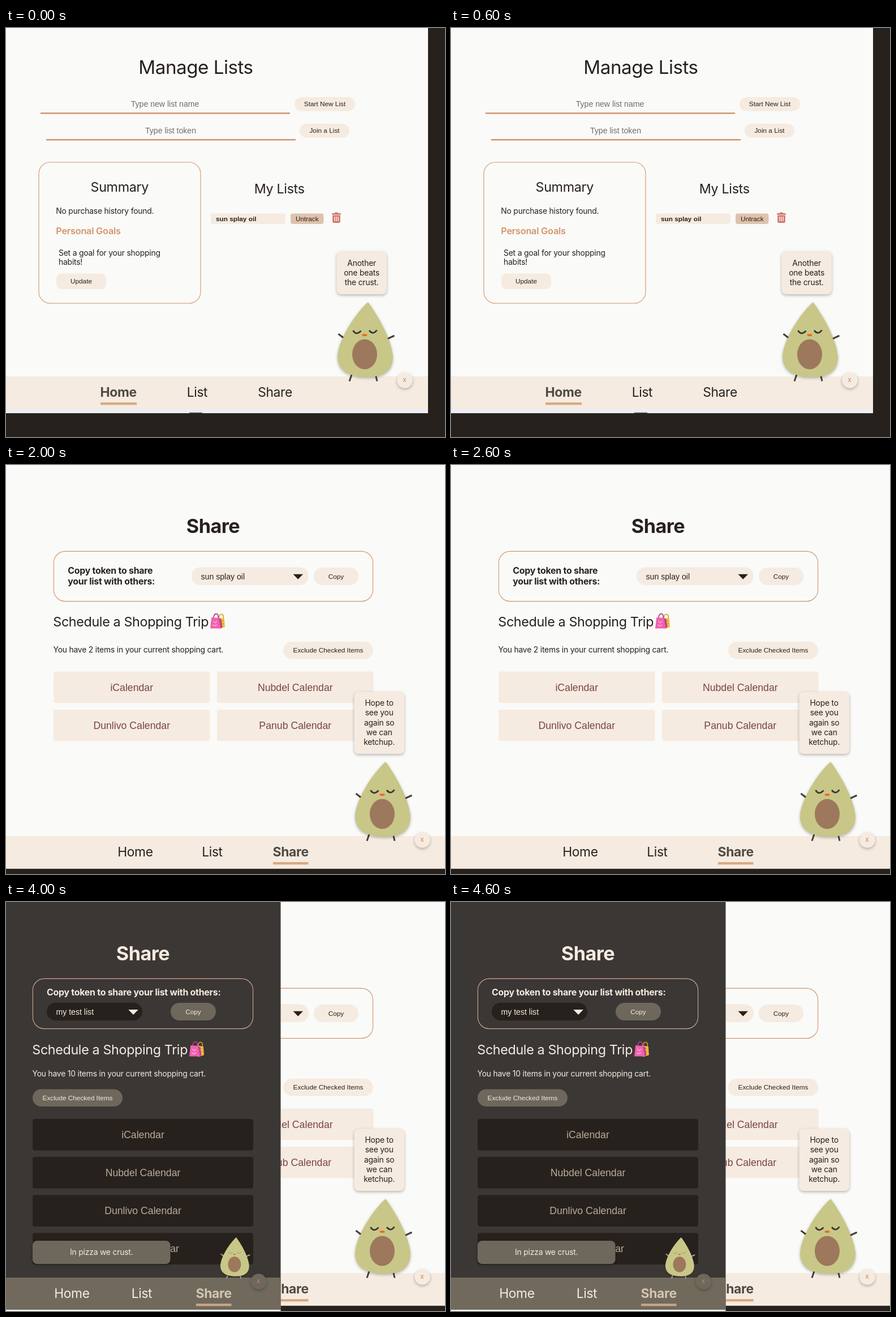
Write an HTML page that moves like this. It is 776 by 722 pixels and loops after 5000 ms.

```html
<!DOCTYPE html>
<html lang="en">
<head>
<meta charset="utf-8">
<title>Shopping list app</title>
<style>
html, body { margin: 0; width: 100%; height: 100%; overflow: hidden; background: #27211d; }
#stage { display: block; width: 776px; height: 722px; }
text { font-family: Inter, "Noto Sans", sans-serif; letter-spacing: -.015em; white-space: pre; }
text.form { font-family: "Liberation Sans", Arial, sans-serif; letter-spacing: 0; }
text.date { font-family: "Liberation Mono", monospace; letter-spacing: .45px; }
.lift { filter: drop-shadow(0 2px 2.5px rgba(0, 0, 0, .28)); }
</style>
</head>
<body>
<svg id="stage" viewBox="0 0 776 722" xmlns="http://www.w3.org/2000/svg"></svg>
<script>
const INK = '#27211d', PAPER = '#fafaf8', CREAM = '#f5ebe0', TAN = '#dec2ad', ORANGE = '#d3956a',
  GRAY = '#716d69', RED = '#d27768', PLUM = '#7a4444', COAL = '#3b3735', STONE = '#6e675b',
  BROWN = '#8c6a47', SAND = '#d0c0ab';

// Shapes
const rect = (x, y, x2, y2, fill, r = 0, extra = '') =>
  `<rect x="${x}" y="${y}" width="${x2 - x}" height="${y2 - y}" rx="${r}" fill="${fill}" ${extra}/>`;
const frame = (x, y, x2, y2, color, r, w, extra = '') =>
  rect(x, y, x2, y2, 'none', r, `stroke="${color}" stroke-width="${w}" ${extra}`);
const path = (d, color, w = 2.6) =>
  `<path d="${d}" fill="none" stroke="${color}" stroke-width="${w}"/>`;
const rule = (x, x2, y, color = ORANGE) => path(`M${x} ${y}H${x2}`, color, 2.5);
const solid = (d, fill) => `<path d="${d}" fill="${fill}"/>`;
const move = (x, y, body, scale = 1) =>
  `<g transform="translate(${x} ${y}) scale(${scale})">${body}</g>`;

// Text
const text = (x, y, str, size = 13.9, fill = INK, anchor = 'start', weight = 400, cls = '') =>
  `<text class="${cls}" x="${x}" y="${y}" font-size="${size}" fill="${fill}" text-anchor="${anchor}" font-weight="${weight}">${str}</text>`;
const mid = (x, y, str, size, fill, weight) => text(x, y, str, size, fill, 'middle', weight);
const bold = (x, y, str, size, fill, weight = 700) => text(x, y, str, size, fill, 'start', weight);
const form = (x, y, str, size = 14.1, fill = INK, anchor = 'start', weight = 400) =>
  text(x, y, str, size, fill, anchor, weight, 'form');

// Widgets
const button = (x, y, x2, y2, label, { fill = CREAM, color = INK, size = 11.8, r = 16 } = {}) =>
  rect(x, y, x2, y2, fill, Math.min(r, (y2 - y) / 2)) +
  form((x + x2) / 2, (y + y2) / 2 + size * .36, label, size, color, 'middle');

const select = (x, y, x2, label, { fill = '#f4ebdf', color = INK, r = 8, pad = 16.5, gap = 13 } = {}) =>
  rect(x, y, x2, y + 31.5, fill, r) + form(x + pad, y + 21, label, 14.1, color) +
  solid(`M${x2 - gap - 9} ${y + 12.3}h17.5l-8.75 9z`, color);

const cross = (x, y, color, w) =>
  path(`M${x - 12.5} ${y - 12.5}l25 25m0 -25l-25 25`, color, w);
const checkbox = (x, y, fill) =>
  rect(x, y, x + 37, y + 37, fill, 9, `stroke="#d19a6e" stroke-width="2" stroke-dasharray="6 4"`);

const pencil = (x, y, color) => move(x, y,
  solid('M-6 6l1-4 6.5-6.5 3 3-6.5 6.5zM2.5-5.5l1.2-1.2q1.2-.8 2.2.2l.7.7q1 1 .2 2.2l-1.2 1.2z', color));

const trash = (x, y) => move(x, y,
  rect(-8, -7.5, 8, -5, RED, 1) + rect(-3, -9, 3, -7, RED, 1) +
  solid('M-6.8-4H6.8V7q0 2.5-2.5 2.5h-8.6q-2.5 0-2.5-2.5z', RED) +
  path('M-3.2-1.5v8M0-1.5v8M3.2-1.5v8', PAPER, 1.4));

const dateIcon = (x, y) =>
  frame(x - 5, y - 5, x + 5, y + 6, INK, 1, 1.5) + rect(x - 5, y - 5, x + 5, y - 1.5, INK) +
  path(`M${x - 3} ${y - 7}v3m6 0v-3`, INK, 1.5) + rect(x + .5, y + 1.5, x + 3, y + 4, INK);

const dateField = (x, x2) =>
  text(x + .5, 379, 'mm/dd/yyyy', 14.1, INK, 'start', 400, 'date') +
  dateIcon(x2 - 9, 374.5) + rule(x, x2, 387);

const bags = (x, y) => move(x, y,
  path('M2-5q1-7 5-6q4 1 2 8', '#d99a2b', 1.5) +
  solid('M0-6l11 2 1 14-10 3z', '#f2bf3c') + path('M4-1l6 .5M4 4l7 .5', '#d99a2b', 1.2) +
  path('M-7-4q1-8 5-8q4 0 3 8', '#b03a86', 1.6) +
  solid('M-10-6l12 1 3 17-17 0z', '#f062b0') + solid('M2-5l3 17 3-2-2-13z', '#c2408e') +
  path('M-7 0l3 3 3-3M-8 6l3 2 4-2', '#fbb0da', 1.4), 1.08);

const nav = (y, y2, width, labels, active, { fill = CREAM, color = INK, strong = '#4f4a45', bar = '#d9a981' } = {}) => {
  const base = y + 36;
  return rect(0, y, width, y2, fill) + labels.map(([name, x, w]) => name === active
    ? bold(x - .5, base, name, 22.9, strong) + rect(x, base + 10, x + w, base + 14.3, bar)
    : text(x - .8, base, name, 22.8, color)).join('');
};
const tabs = (home, list, share) => [['Home', home, 64], ['List', list, 39], ['Share', share, 62.5]];

// Mascot, with its tip at the origin
const avocado = (limb, eye, w = 3) =>
  path('M-52.5 56l8.5 6.5M34.5 64.5l12-5.5M-29 128l-4 11.5M13.5 129l2.5 10.5', limb, w) +
  `<g class="lift">${solid('M0 0C14 19 40 60 44 96C44 120 29 132 0 132C-38 132-54 119-54 95C-52 64-20 17 0 0z', '#c8c788')}</g>` +
  path('M35 64.5l11-5.2M-47 60.3l3 2.2', limb, w) +
  path('M-26.5 50q5.5 9.5 14 .5M2 50q7 8.5 13.5-.8', eye, 2.8) +
  '<ellipse cx="-6" cy="58" rx="4.6" ry="2.1" fill="#ee6a1f"/>' +
  '<ellipse cx="-6" cy="92" rx="22" ry="26.5" fill="#9d785c"/>';

const closeButton = (x, y, fill) =>
  `<circle class="lift" cx="${x}" cy="${y}" r="13.8" fill="${fill}"/>` + form(x - .5, y + 3, 'x', 12, '#cf8452', 'middle');

const mascot = (dx, dy, lines) => move(dx, dy,
  rect(584.5, 445.3 - lines.length * 17, 673, 470, CREAM, 8, 'class="lift"') +
  lines.map((line, i) => mid(628.7, 453.7 - (lines.length - 1 - i) * 17.1, line)).join('') +
  move(640, 484, avocado('#46413d', '#3d3733')) + closeButton(705, 622, CREAM));

const toast = (x, x2, y, line) =>
  rect(x, y, x2, y + 41, STONE, 8, 'class="lift"') + mid((x + x2) / 2, y + 25.3, line, 13.9, CREAM);
const smallMascot = (x, y) =>
  move(x, y, avocado('#b8ad9c', '#a3a68a', 3.2), .52) + closeButton(x + 39.5, y + 78, STONE);

const layer = (width, height, body) =>
  `<svg width="${width}" height="${height}" style="overflow:hidden">${body}</svg>`;

// Screens
const homeLight = () => layer(746, 680,
  rect(0, 0, 746, 680, PAPER) + mid(335.5, 80.5, 'Manage Lists', 33.2) +
  form(281, 139, 'Type new list name', 14.1, GRAY, 'middle') + rule(61, 502, 150.5) +
  button(510, 122, 617, 146.5, 'Start New List') +
  form(291, 186, 'Type list token', 14.1, GRAY, 'middle') + rule(71, 512, 197.3) +
  button(519, 169, 607, 193.5, 'Join a List') +
  frame(58, 237, 344, 486, ORANGE, 20, 1.1) + mid(200.8, 289, 'Summary', 23.3) +
  text(88.3, 328, 'No purchase history found.') +
  bold(88.3, 364, 'Personal Goals', 16.3, ORANGE, 600) +
  text(93, 402, 'Set a goal for your shopping') + text(93, 417.5, 'habits!') +
  button(89, 433.5, 177, 461, 'Update', { r: 9 }) +
  mid(483.2, 292, 'My Lists', 23.3) +
  rect(362, 327.5, 494, 346, CREAM, 4) + form(371, 341, 'sun splay oil', 11.8, INK, 'start', 700) +
  button(503, 327.5, 561.5, 346, 'Untrack', { fill: TAN, r: 4 }) + trash(584, 334.5) +
  nav(615, 672, 746, tabs(167, 320.5, 446), 'Home') +
  rect(0, 672, 746, 680, '#eceef3') + rect(324, 678.7, 347, 680, '#55565c') +
  mascot(0, 0, ['Another', 'one beats', 'the crust.']));

const listLight = () => layer(729, 712.5,
  rect(0, 0, 729, 713, PAPER) +
  form(325, 41.5, 'sun splay oil', 35.3, INK, 'middle') + pencil(481, 31.5, ORANGE) +
  text(52.6, 71.5, 'Add:') + form(350, 70, 'Item name', 14.1, GRAY, 'middle') + rule(82, 618, 81.3) +
  text(52, 124.5, 'Frequency:') + select(125, 103.5, 228, 'Soon') +
  text(244.7, 124.5, 'Select List:') + select(316.5, 103.5, 475, 'sun splay oil', { gap: 15.5 }) +
  button(493, 106, 581, 132, 'Submit', { fill: TAN, size: 14.1 }) +
  frame(52, 169.5, 619, 544.5, '#dfbfa6', 10, 2) +
  bold(70, 209, 'Search &amp; Filter', 17.2, ORANGE, 600) +
  text(70, 259, 'Search by') + text(70, 275.7, 'Name:') +
  form(165.5, 266, 'Start typing here...', 14.1, GRAY) + rule(164, 600, 281.3) +
  frame(72.5, 322.5, 602, 419.5, '#dcb797', 9, 1, 'stroke-dasharray="3 2"') +
  rect(92, 318, 245.5, 328, PAPER) + text(95.7, 327.7, 'Search by Date Range:') +
  text(94, 380.5, 'Start:') + dateField(147.5, 325) +
  text(336.5, 380.5, 'End:') + dateField(383.5, 568) +
  text(70, 455, 'Filter by') + text(70, 471.7, 'Urgency:') +
  select(171.5, 441.5, 600, 'Choose urgency', { pad: 17.3, gap: 28.5 }) +
  button(70.5, 496, 187, 526, 'Clear All Filters', { fill: TAN, size: 14.1, r: 8 }) +
  rect(53, 570, 618, 606, RED, 5) + rect(53, 596, 618, 660, '#f0e8e2') +
  mid(335.5, 588, 'Soon') + mid(335.5, 638.5, 'apple', 21) +
  checkbox(91, 614.5, PAPER) + cross(561.5, 633, PLUM, 6) +
  nav(658, 713, 729, tabs(167, 317, 446), 'List') +
  mascot(0, 43, ['Gurl,', 'peas.']));

const calendars = ['iCalendar', 'Nubdel Calendar', 'Dunlivo Calendar', 'Panub Calendar'];

const shareLight = () => layer(776, 712.5,
  rect(0, 0, 776, 713, PAPER) + mid(366, 120, 'Share', 34.2, INK, 700) +
  frame(84.4, 152.4, 648.6, 240.6, ORANGE, 20, 1.1) +
  bold(109.2, 192.3, 'Copy token to share', 15.9) + bold(109.2, 211, 'your list with others:', 15.9) +
  select(328, 180.5, 535, 'sun splay oil', { fill: CREAM, r: 15.7, gap: 18.5 }) +
  button(544, 181, 623, 212, 'Copy') +
  text(83.3, 285, 'Schedule a Shopping Trip', 23.3) + bags(374, 275.5) +
  text(83.5, 331, 'You have 2 items in your current shopping cart.') +
  button(490, 312, 649, 342.5, 'Exclude Checked Items') +
  calendars.map((name, i) => {
    const x = i % 2 ? 373 : 84, y = i < 2 ? 364.5 : 431.7;
    return button(x, y, x + 276.5, y + 55.5, name, { color: PLUM, size: 17.7, r: 4 });
  }).join('') +
  nav(655, 713, 776, tabs(198, 347, 472), 'Share') +
  mascot(31, 40, ['Hope to', 'see you', 'again so', 'we can', 'ketchup.']));

const darkNav = { fill: '#716a5c', color: CREAM, strong: '#d3c5b3', bar: '#c9a486' };
const darkField = { fill: INK, color: CREAM };
const brownButton = { fill: BROWN, color: CREAM, size: 14.1 };

const darkItem = (y, name) =>
  rect(38, y, 355, y + 40, '#cc8074', 5) + rect(38, y + 60, 355, y + 132, INK, 5) +
  rect(38, y + 25.5, 355, y + 100, INK) +
  mid(196.5, y + 17.3, 'Soon', 13.9, CREAM) + mid(196.5, y + 55, name, 21, CREAM) +
  path(`M38 ${y + 75}H355M196 ${y + 75}V${y + 132}`, SAND, 2) +
  checkbox(98, y + 85.5, COAL) + cross(275.5, y + 103.5, SAND, 5.4);

const listDark = () => layer(387.5, 717,
  rect(0, 0, 388, 717, COAL) +
  form(186, 32, 'sun splay oil', 26.4, CREAM, 'middle') + pencil(328, 24.5, '#d8aa84') +
  mid(196.5, 63, 'Add:', 13.9, CREAM) + form(196.5, 90, 'Item name', 14.1, '#938c84', 'middle') +
  rule(70, 323, 101.5, '#d3a98a') +
  mid(196.2, 137, 'Frequency:', 13.9, CREAM) + select(145, 145, 248, 'Soon', darkField) +
  mid(196.2, 200.3, 'Select List:', 13.9, CREAM) +
  select(117.5, 209, 276, 'sun splay oil', { ...darkField, gap: 15.5 }) +
  button(153, 251.7, 241, 278, 'Submit', brownButton) +
  frame(37, 298.5, 356, 365.5, BROWN, 10, 2) +
  bold(70.5, 336, 'Search &amp; Filter', 17.2, '#d1a68c', 600) +
  button(206, 317, 322, 346.7, 'Clear All Filters', { ...brownButton, r: 8 }) +
  darkItem(386, 'apple') + darkItem(536, 'banana') +
  nav(664, 717, 388, tabs(65, 178, 271), 'List', darkNav) +
  toast(38, 236, 598.7, 'You look radishing today.') + smallMascot(320.8, 593));

const shareDark = () => layer(485.5, 722,
  rect(0, 0, 486, 722, PAPER) + rect(0, 0, 486, 719.5, COAL) +
  mid(242, 103, 'Share', 34.2, CREAM, 700) +
  frame(47.4, 135.4, 436.6, 223.6, '#cfa78c', 20, 1.1) +
  bold(71.9, 165, 'Copy token to share your list with others:', 15.9, CREAM) +
  select(72, 177.7, 241, 'my test list', { ...darkField, r: 15.7, gap: 15.7 }) +
  button(291, 178, 371, 209, 'Copy', { fill: STONE, color: CREAM }) +
  text(46.3, 269, 'Schedule a Shopping Trip', 23.3, CREAM) + bags(337, 259.5) +
  text(46.5, 308, 'You have 10 items in your current shopping cart.', 13.9, CREAM) +
  button(47, 330.5, 206, 361, 'Exclude Checked Items', { fill: STONE, color: CREAM }) +
  calendars.map((name, i) =>
    button(47, 383 + i * 67.1, 437, 438.5 + i * 67.1, name, { fill: INK, color: '#b9ab98', size: 17.7, r: 4 })).join('') +
  nav(663, 719.5, 486, tabs(86, 222.5, 336), 'Share', darkNav) +
  toast(47, 290.5, 598, 'In pizza we crust.') + smallMascot(407, 592));

// Each screen with the span of seconds it stays visible
const screens = [[homeLight, 0, 2], [listLight, 1, 2], [shareLight, 2, 5], [listDark, 3, 4], [shareDark, 4, 5]];
const stage = document.getElementById('stage');
stage.innerHTML = rect(0, 0, 776, 722, INK) + screens.map(([draw]) => `<g>${draw()}</g>`).join('');
const groups = [...stage.children].slice(1);

function render(ms) {
  const second = Math.floor(ms % 5000 / 1000);
  screens.forEach(([, from, to], i) => {
    groups[i].style.display = second >= from && second < to ? '' : 'none';
  });
}

const start = performance.now();
function tick() {
  render(performance.now() - start);
  requestAnimationFrame(tick);
}
tick();
</script>
</body>
</html>
```
